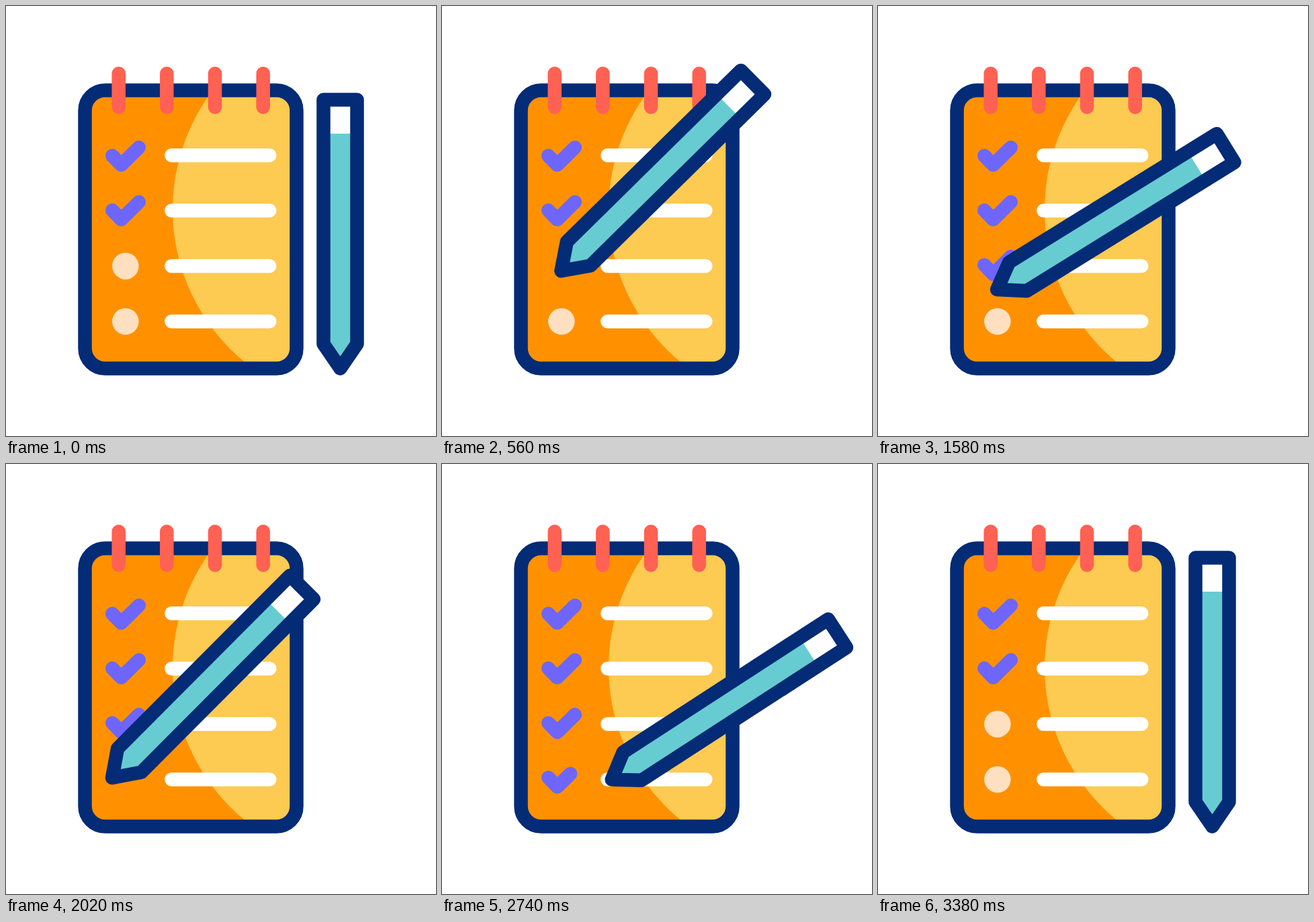
These frames come from a looping animation (640 px wide and 640 px high, 3.6 s). An HTML page:

```html
<!DOCTYPE html>
<html lang="en">
<head>
<meta charset="utf-8">
<title>Checklist</title>
<style>
html, body { margin: 0; width: 100%; height: 100%; overflow: hidden; background: #fff; }
svg { display: block; width: 100vw; height: 100vh; }
</style>
</head>
<body>
<svg viewBox="0 0 640 640" fill="none" stroke-width="20.5" stroke-linecap="round" stroke-linejoin="round">
  <defs>
    <clipPath id="page"><rect x="117.5" y="125.5" width="315" height="414" rx="30"/></clipPath>
  </defs>
  <g clip-path="url(#page)">
    <rect x="117" y="125" width="316" height="415" fill="#ff9100"/>
    <circle cx="542" cy="303" r="294" fill="#fdca52"/>
  </g>
  <rect x="117.5" y="125.5" width="315" height="414" rx="30" stroke="#042b76"/>
  <path stroke="#ff6152" d="M167.7 100.5v50M239.3 100.5v50M311 100.5v50M382.7 100.5v50"/>
  <path stroke="#fff" d="M246.3 222.2h146M246.3 304.6h146M246.3 387.1h146M246.3 469.5h146"/>
  <g id="dots" fill="#fee0c0">
    <circle cx="177.8" cy="387.1" r="19.8"/>
    <circle cx="177.8" cy="469.5" r="19.8"/>
  </g>
  <g id="checks" stroke="#6e66fb"></g>
  <g id="pencil">
    <path fill="#fff" d="M-25-400h50v60h-50z"/>
    <path fill="#67ccd1" d="M-25-349.5h50v313L0 0-25-36.5z"/>
    <path stroke="#042b76" d="M-25-400h50v363.5L0 0-25-36.5z"/>
  </g>
</svg>
<script>
const LOOP = 3600, STEP = 20;
const dots = document.querySelectorAll('#dots circle');
const pencil = document.getElementById('pencil');
const holder = document.getElementById('checks');

const checks = [0, 1, 2, 3].map(row => {
  const p = document.createElementNS('http://www.w3.org/2000/svg', 'path');
  p.setAttribute('d', `M158.2 ${222.8 + row * 81.3}l13.3 13.7 26.3-26`);
  p.setAttribute('pathLength', 1);
  holder.append(p);
  return p;
});

const clamp = v => Math.min(1, Math.max(0, v));
const ramp = (t, a, b) => clamp((t - a) / (b - a));
const smooth = u => u * u * (3 - 2 * u);

// Keys are [time, ...values]; segments are eased unless linear is set.
function track(keys, t, linear) {
  let i = 1;
  while (i < keys.length - 1 && t > keys[i][0]) i++;
  const a = keys[i - 1], b = keys[i];
  const u = ramp(t, a[0], b[0]);
  const k = linear ? u : smooth(u);
  return a.slice(1).map((v, n) => v + (b[n + 1] - v) * k);
}

const rest = [497.5, 539.5];
const travelIn = [[0, ...rest], [655, 158, 385.5]];
const travelMid = [[1220, 198, 373], [1920, 158, 467]];
const travelOut = [[2500, 198, 454], [3380, ...rest]];
const stroke3 = [[870, 158, 385.5], [1085, 171, 402], [1190, 198, 373]];
const stroke4 = [[2150, 158, 467], [2370, 171, 483], [2460, 198, 454]];
const tilt = [[0, 0], [640, 47.5], [960, 47.5], [1460, 59.5], [2170, 43],
  [2640, 58], [2690, 58], [3350, 0]];

function tipAt(t) {
  if (t < 870) return track(travelIn, t);
  if (t < 1220) return track(stroke3, t, true);
  if (t < 2150) return track(travelMid, t);
  if (t < 2500) return track(stroke4, t, true);
  return track(travelOut, t);
}

function drawCheck(path, p, opacity) {
  path.style.display = p > 0 && opacity > 0 ? '' : 'none';
  path.setAttribute('stroke-dasharray', p < 1 ? `${p} 2` : 'none');
  path.setAttribute('opacity', opacity);
}

function render(t) {
  const [x, y] = tipAt(t);
  pencil.setAttribute('transform', `translate(${x} ${y}) rotate(${track(tilt, t)[0]})`);

  const back = ramp(t, 3200, 3360);
  drawCheck(checks[2], ramp(t, 860, 1580), 1 - back);
  drawCheck(checks[3], ramp(t, 2140, 2860), 1 - back);
  dots[0].setAttribute('opacity', 1 - ramp(t, 320, 500) + back);
  dots[1].setAttribute('opacity', 1 - ramp(t, 1600, 1780) + back);
}

function loop() {
  const t = performance.now() % LOOP;
  render(Math.floor(t / STEP) * STEP);
  requestAnimationFrame(loop);
}
loop();
</script>
</body>
</html>
```
